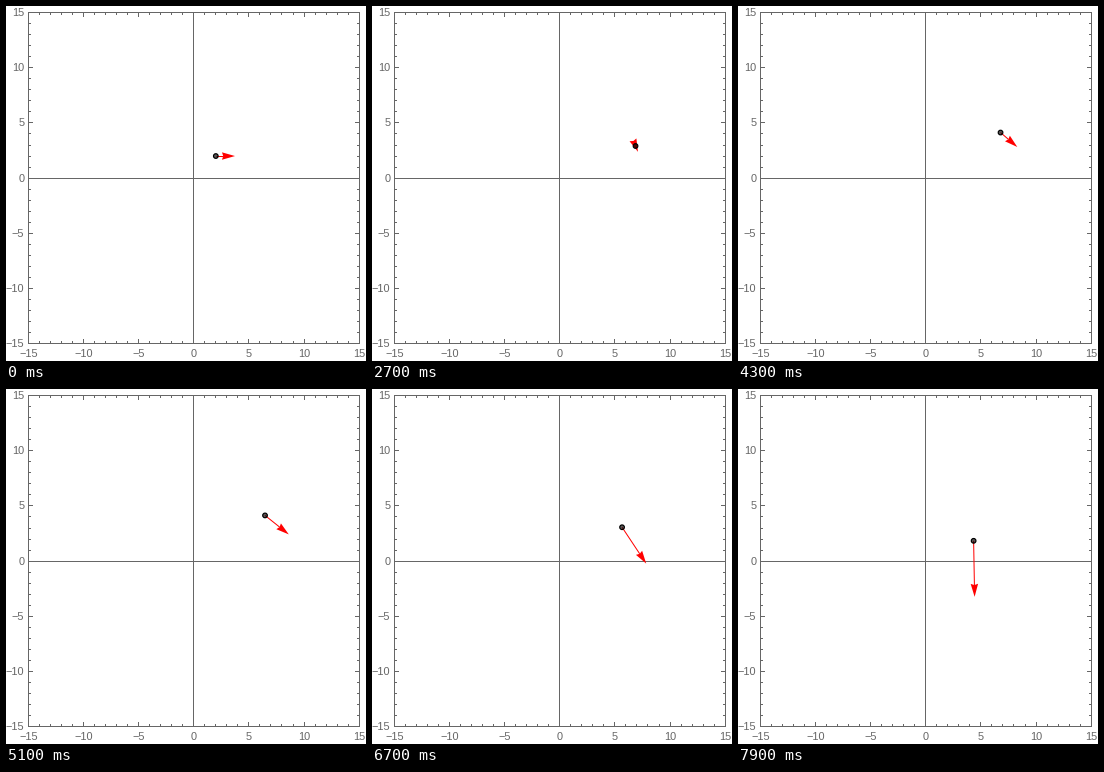
A matplotlib script that plays this animation: 360 by 355 pixels, repeating every 8000 ms.

```python
import numpy as np
import matplotlib.pyplot as plt
from matplotlib.animation import FuncAnimation
from matplotlib.patches import Circle, Polygon

W, H, DPI = 360, 355, 100
PX = 72 / DPI                        # one pixel in points
FRAMES, STEP = 80, 100
ORIGIN = np.array([187.75, 172.1])   # pixel position of (0, 0)
UNIT = 11.03                         # pixels per data unit
LIMIT, MAJOR = 15, 5
GRAY = "#666666"
HEAD, HALF, NOTCH = 13.0, 3.7, 11.8  # arrowhead length, half width, notch depth

# Smooth curves through a few poses: time in frames, dot and arrow in data units
KEY_T = np.array([0, 14, 27, 43, 59, 67, 79]) / FRAMES
DOT_X = [2, 5.37, 6.87, 6.78, 6.11, 5.65, 4.34]
DOT_Y = [2, 1.40, 2.91, 4.13, 3.76, 3.07, 1.84]
VEC_X = [1.74, 0.155, 0.22, 1.52, 2.46, 2.19, 0.09]
VEC_Y = [0, 0.41, -0.53, -1.31, -2.36, -3.30, -5.08]
DEGREE = len(KEY_T) - 1
COEFS = np.polyfit(KEY_T, np.column_stack([DOT_X, DOT_Y, VEC_X, VEC_Y]), DEGREE)


def pose(k):
    """Dot position and arrow vector in pixels."""
    powers = (k / FRAMES) ** np.arange(DEGREE, -1, -1)
    x, y, dx, dy = powers @ COEFS * UNIT
    return ORIGIN + [x, -y], np.array([dx, -dy])


def cell(v):
    """Centre of the pixel that holds v."""
    return np.floor(v) + 0.5


fig = plt.figure(figsize=(W / DPI, H / DPI), dpi=DPI, facecolor="white")
ax = fig.add_axes([0, 0, 1, 1])
ax.set_xlim(0, W)
ax.set_ylim(H, 0)
ax.axis("off")


def line(x0, y0, x1, y1):
    ax.plot([x0, x1], [y0, y1], color=GRAY, lw=PX, solid_capstyle="butt",
            snap=False)


def label(x, y, n, align):
    ax.text(x, y, str(n).replace("-", "\u2212"), color=GRAY, ha=align,
            va="baseline", family="Liberation Sans", size=11 * PX)


left, mid_x, right = cell(ORIGIN[0] + np.array([-1, 0, 1]) * LIMIT * UNIT)
top, mid_y, bottom = cell(ORIGIN[1] + np.array([-1, 0, 1]) * LIMIT * UNIT)
for x in (left, mid_x, right):
    line(x, top - 0.5, x, bottom + 0.5)
for y in (top, mid_y, bottom):
    line(left - 0.5, y, right + 0.5, y)

for n in range(-LIMIT, LIMIT + 1):
    x, y = cell(ORIGIN + np.array([n, -n]) * UNIT)
    size = 4.5 if n % MAJOR == 0 else 2.5
    line(x, top, x, top + size)
    line(x, bottom, x, bottom - size)
    line(left, y, left + size, y)
    line(right, y, right - size, y)
    if n % MAJOR == 0:
        label(x, 351, n, "center")
        label(18.3, y + 3.5, n, "right")

shaft, = ax.plot([], [], color="red", lw=PX, solid_capstyle="butt", zorder=4)
head = Polygon(np.zeros((4, 2)), fc="red", ec="none", zorder=5)
dot = Circle((0, 0), 2.3, fc=(0, 0, 0, 0.65), ec="black", lw=1.2 * PX, zorder=6)
ax.add_patch(head)
ax.add_patch(dot)


def update(k):
    pos, vec = pose(k)
    length = np.hypot(*vec)
    d = vec / length
    side = np.array([-d[1], d[0]]) * HALF
    tip = pos + vec
    notch = tip - d * NOTCH
    base = tip - d * HEAD
    head.set_xy([tip, base + side, notch, base - side])
    shaft.set_data(*zip(pos, notch))
    shaft.set_visible(bool(length > NOTCH))
    dot.center = tuple(pos)
    return shaft, head, dot


anim = FuncAnimation(fig, update, frames=FRAMES, interval=STEP,
                     repeat=True, repeat_delay=0, blit=False)
plt.show()
```
